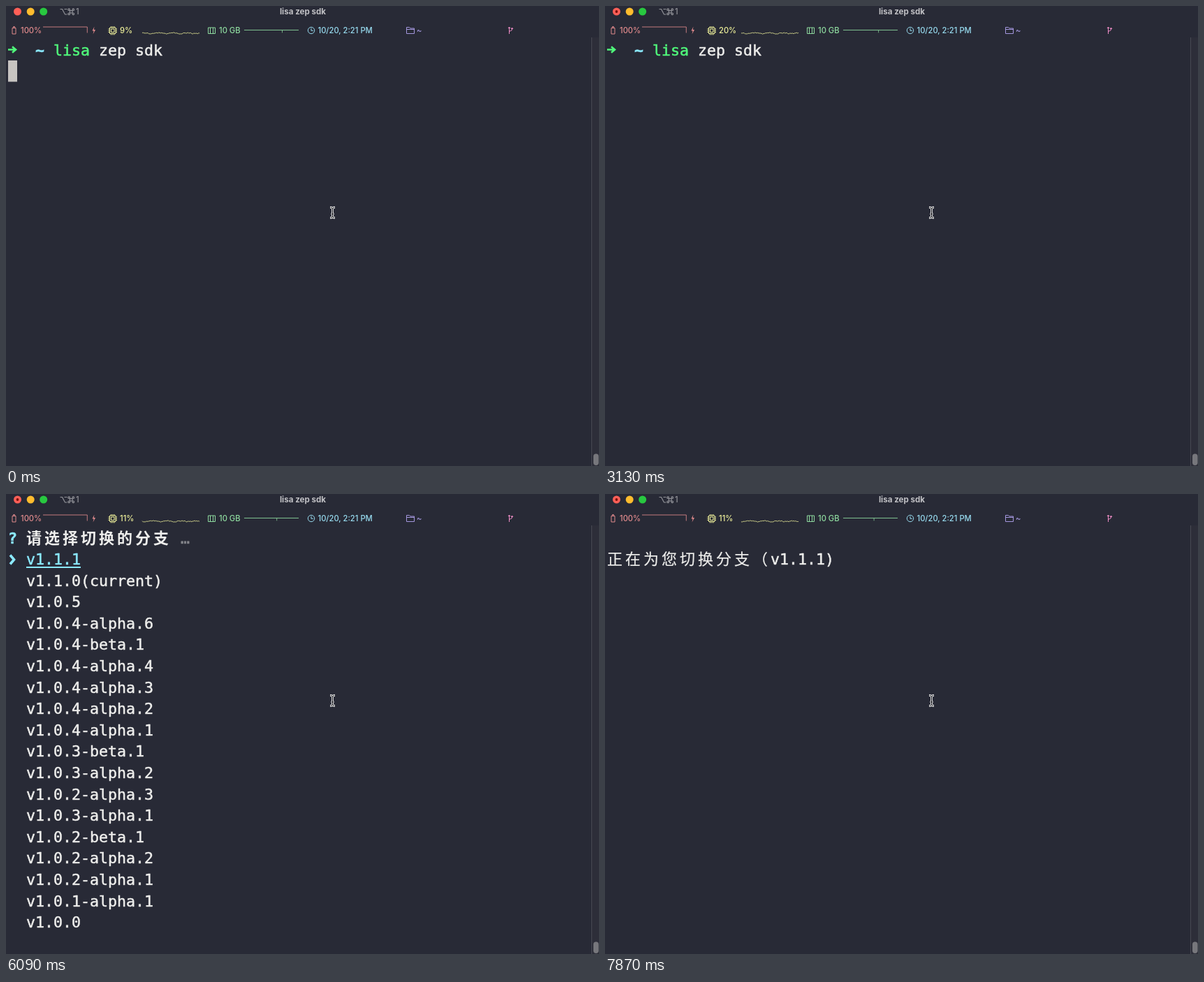
An HTML page for the animation above (8 s loop, 849 by 659 pixels).

```html
<!DOCTYPE html>
<html lang="zh">
<head>
<meta charset="utf-8">
<title>lisa zep sdk</title>
<style>
  html, body { margin: 0; width: 100%; height: 100%; overflow: hidden; background: #282a36; }
  svg { display: block; }
  text { white-space: pre; }
  .mono { font: 21.594px "DejaVu Sans Mono", "Noto Sans CJK SC", "Noto Sans CJK", monospace; color: #eeeeec; }
  .mono text { fill: currentColor; stroke: currentColor; stroke-width: .5px; }
  .mono .cjk { font: 22px "Noto Sans CJK SC", "Noto Sans CJK", sans-serif; letter-spacing: 4px; stroke-width: .2px; }
  .mono .strong { font-weight: 700; stroke: none; }
  .bar { font: 500 11.2px Inter, sans-serif; }
  .line { fill: none; stroke-width: 1; }
</style>
</head>
<body>
<svg width="849" height="659" viewBox="0 0 849 659">
  <rect width="849" height="659" fill="#282a36"/>

  <!-- title bar -->
  <circle cx="16.5" cy="8" r="5.5" fill="#ff5f57"/>
  <circle id="edited" cx="16.5" cy="8" r="1.9" fill="#7c100c"/>
  <circle cx="35.2" cy="8" r="5.5" fill="#febc2e"/>
  <circle cx="53.7" cy="8" r="5.5" fill="#28c840"/>
  <g fill="none" stroke="#929399" stroke-width="1.2">
    <path d="M77.5 4.500h3l4 7.500h3M83.500 4.500h4M91.500 6.500h3.500v3.500h-3.500z"/>
    <circle cx="90.200" cy="5.200" r="1.300"/>
    <circle cx="96.300" cy="5.200" r="1.300"/>
    <circle cx="90.200" cy="11.300" r="1.300"/>
    <circle cx="96.300" cy="11.300" r="1.300"/>
  </g>
  <text class="bar" x="100" y="12.2" fill="#929399">1</text>
  <text x="425" y="12" text-anchor="middle" fill="#c0c0c4" style="font:700 11.6px Inter,sans-serif">lisa zep sdk</text>

  <!-- status bar -->
  <g class="line" stroke="#e08a8c">
    <path d="M9 31.5h5v8.500h-5zM10.500 31v-1.500h2V31"/>
    <path d="M53 30h63.300v8.500" stroke-opacity=".85"/>
    <path d="M126.500 29.500l-3 6h2.200l-1.200 5 3.600-6.500h-2.400z" fill="#e08a8c" stroke="none"/>
  </g>
  <text class="bar" x="21" y="39.2" fill="#e08a8c">100%</text>
  <g class="line" stroke="#eef09a">
    <path d="M148.500 31h8.500v8.500h-8.500zM150.500 33h4.500v4.500h-4.500z"/>
    <path d="M150.500 29v2m2.300-2v2m2.200-2v2M150.500 39.500v2m2.300-2v2m2.200-2v2M146.500 33h2m-2 2.300h2m-2 2.200h2M157 33h2m-2 2.300h2m-2 2.200h2"/>
    <path id="cpuLine" stroke-opacity=".8"/>
  </g>
  <text id="cpu" class="bar" x="163" y="39.2" fill="#eef09a"></text>
  <g class="line" stroke="#8fdca0">
    <path d="M289.500 31h10v8.500h-10zM292.500 31v8.500M296.500 31v8.500"/>
    <path d="M341 34.500h78" stroke-opacity=".85"/>
    <path id="memTick" d="M.5 34.500v3.800" stroke-opacity=".75"/>
  </g>
  <text class="bar" x="305" y="39.2" fill="#8fdca0">10 GB</text>
  <g class="line" stroke="#98dcf0">
    <circle cx="437" cy="35" r="4.7"/>
    <path d="M437 31.800V35.300h2.800"/>
  </g>
  <text class="bar" x="446.5" y="39.2" fill="#98dcf0">10/20, 2:21 PM</text>
  <path class="line" stroke="#a497de" d="M573.500 39.500v-9h4l1.500 1.500h5.500v7.500zM573.500 33.500h11"/>
  <text class="bar" x="588" y="39.2" fill="#a497de">~</text>
  <g class="line" stroke="#ee8dc6">
    <path d="M720.500 31v9M720.500 37.500q0-2 2-2t2-2.500v-1"/>
    <path d="M719 32l1.500-2 1.500 2M723 33l1.500-2 1.500 2"/>
  </g>

  <!-- scroll bar -->
  <rect x="838" y="45" width="11" height="614" fill="#2d2e39"/>
  <rect x="838" y="45" width="1" height="614" fill="#484953"/>
  <rect x="841" y="641.5" width="7.5" height="16.5" rx="3.7" fill="#77777c"/>

  <!-- terminal views -->
  <g id="command" class="mono">
    <path d="M3 62.500h10M9 58.200l5 4.300-5 4.300" fill="none" stroke="#50fa7b" stroke-width="2.6"/>
    <text x="42" y="70.5" color="#8be9fd" font-weight="bold">~</text>
    <text x="68" y="70.5" color="#50fa7b">lisa</text>
    <text x="133" y="70.5">zep sdk</text>
    <rect id="cursor" x="3" y="78" width="13" height="30.5" fill="#c7c4c1"/>
  </g>
  <g id="menu" class="mono">
    <text x="3" y="70.5" color="#8be9fd" font-weight="bold">?</text>
    <text class="cjk strong" x="29" y="70.8">请选择切换的分支</text>
    <text x="250" y="70.5" color="#85868c">…</text>
    <g id="items"></g>
    <path id="pointer" d="M6 87.500l5.500 6.500-5.500 6.500" fill="none" stroke="#8be9fd" stroke-width="3.600"/>
    <rect id="underline" x="29" y="104" width="78" height="2" fill="#8be9fd"/>
  </g>
  <g id="result" class="mono">
    <text class="cjk" x="3" y="101.3">正在为您切换分支（</text>
    <text x="237" y="101">v1.1.1)</text>
  </g>

  <!-- mouse pointer -->
  <g fill="none">
    <path id="beam" d="M464 288.500q3.500 0 3.500 2.500v10q0 2.500-3.500 2.500M471 288.500q-3.500 0-3.500 2.500M467.500 301q0 2.500 3.500 2.500M465.500 298h4" stroke="#f4f4f4" stroke-width="2.800"/>
    <use href="#beam" visibility="hidden"/>
    <path d="M464.500 288.500q3 0 3 2.500v10q0 2.500-3 2.500M470.500 288.500q-3 0-3 2.500M467.500 301q0 2.500 3 2.500M466 298h3" stroke="#15151a"/>
  </g>
</svg>
<script>
const LOOP = 8000, CELL = 13, ROW = 30.6;
const $ = id => document.getElementById(id);

const versions = `v1.1.1 v1.1.0(current) v1.0.5 v1.0.4-alpha.6 v1.0.4-beta.1
  v1.0.4-alpha.4 v1.0.4-alpha.3 v1.0.4-alpha.2 v1.0.4-alpha.1 v1.0.3-beta.1
  v1.0.3-alpha.2 v1.0.2-alpha.3 v1.0.3-alpha.1 v1.0.2-beta.1 v1.0.2-alpha.2
  v1.0.2-alpha.1 v1.0.1-alpha.1 v1.0.0`.split(/\s+/);

const items = versions.map((name, i) => {
  const item = document.createElementNS('http://www.w3.org/2000/svg', 'text');
  item.setAttribute('x', 29);
  item.setAttribute('y', 101 + i * ROW);
  item.textContent = name;
  return $('items').appendChild(item);
});

// [start time, value]
const views = [[0, 'command'], [3730, 'menu'], [6970, 'result']];
const selection = [[0, 0], [4910, 1], [5940, 0]];
const cpuLoad = [9, 19, 19, 20, 18, 13, 11, 11, 11];

const valueAt = (steps, t) => steps.filter(([start]) => start <= t).pop()[1];
const show = (id, on) => $(id).setAttribute('visibility', on ? 'inherit' : 'hidden');

function noise(i) {
  const v = Math.sin(i * 12.9898 + 4.1) * 43758.5453;
  return v - Math.floor(v);
}

function cpuPath(shift) {
  const points = [];
  for (let i = 0; i < 60; i++) {
    const k = i + shift;
    const y = 39 + 0.6 * Math.sin(k * 0.42 + 4) + (noise(k) - 0.5) * 1.3;
    points.push(`${(195 + i * 1.39).toFixed(1)} ${y.toFixed(1)}`);
  }
  return 'M' + points.join('L');
}

function select(index) {
  items.forEach((item, i) => item.setAttribute('color', i === index ? '#8be9fd' : '#eeeeec'));
  const move = `translate(0 ${index * ROW})`;
  $('pointer').setAttribute('transform', move);
  $('underline').setAttribute('transform', move);
  $('underline').setAttribute('width', versions[index].length * CELL);
}

function draw(t) {
  const updates = Math.floor((t + 400) / 1000);
  $('cpu').textContent = cpuLoad[updates] + '%';
  $('cpuLine').setAttribute('d', cpuPath(updates));
  $('memTick').setAttribute('transform', `translate(${395 - updates * 1.3} 0)`);

  const view = valueAt(views, t);
  for (const [, id] of views) show(id, id === view);
  show('cursor', t < 1790);
  show('edited', t >= 600);
  select(valueAt(selection, t));
}

const begin = performance.now();
function tick() {
  draw((performance.now() - begin) % LOOP);
  requestAnimationFrame(tick);
}
tick();
</script>
</body>
</html>
```
